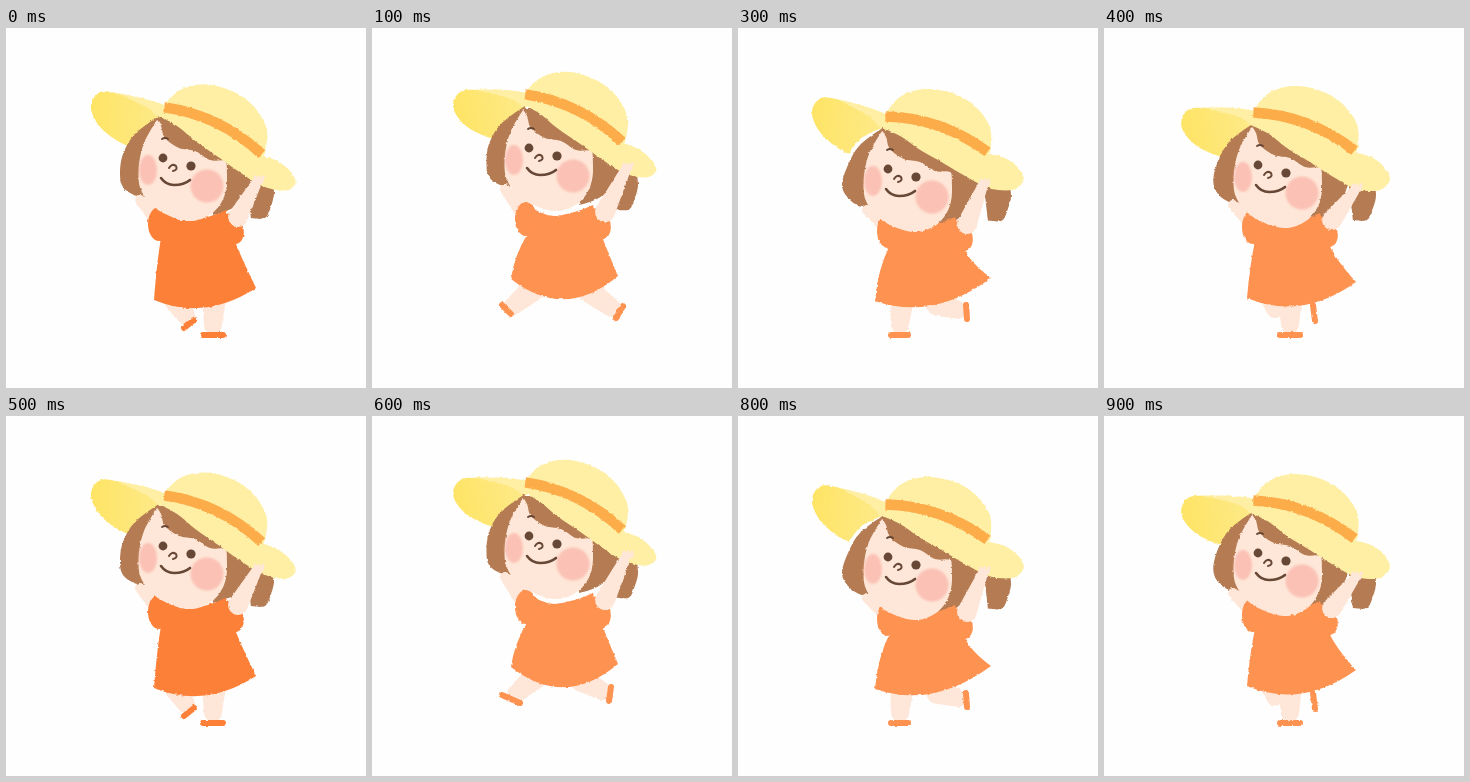
Write an HTML page that moves like this. It is 360 by 360 pixels and loops after 1000 ms.

```html
<!DOCTYPE html>
<html lang="en">
<head>
<meta charset="utf-8">
<title>Running girl</title>
<style>
html, body { margin: 0; width: 100%; height: 100%; overflow: hidden; background: #fefefe; }
svg { display: block; width: 100%; height: 100%; }
</style>
</head>
<body>
<svg viewBox="0 0 360 360">
  <defs>
    <filter id="crayon" filterUnits="userSpaceOnUse" x="0" y="0" width="360" height="360" color-interpolation-filters="sRGB">
      <feTurbulence id="noise" type="fractalNoise" baseFrequency="0.3" numOctaves="2" seed="1"/>
      <feDisplacementMap in="SourceGraphic" scale="2.6" xChannelSelector="R" yChannelSelector="G"/>
    </filter>
    <filter id="soft"><feGaussianBlur stdDeviation="0.8"/></filter>
    <linearGradient id="under">
      <stop offset="0" stop-color="#fee465"/><stop offset="1" stop-color="#fdea8c"/>
    </linearGradient>
  </defs>
  <g id="body" filter="url(#crayon)"></g>
  <g id="face"></g>
</svg>
<script>
const C = {
  hat: '#feefa4', band: '#fdac4a', hair: '#b57b53', skin: '#fee7d8',
  cheek: '#fbc1b5', ink: '#674735', deep: '#fd8039', light: '#fe9250'
};

// Key points of one pose: head centre, left end of the hat band, hat tilt,
// turn of the floppy side, brim depth, tail swing, neck, hem corners, hands, legs.
// A leg runs from hip to ankle; its shoe is a short stroke.
const leg = (hip, ankle, from, to) => ({ hip, ankle, from, to });
const pass = {
  head: [171, 134], hat: [160, 78], tilt: 24.5, flop: 0, brim: 1, swing: 0,
  neck: [181, 193], hem: [[148, 272], [250, 260]], hands: [[134, 172], [251, 154]], dress: C.deep,
  legs: [leg([171, 273], [180, 288], [178, 300], [188, 292]), leg([208, 270], [207, 297], [197, 307], [217, 307])]
};
const leap = {
  head: [171, 124], hat: [155, 65], tilt: 25, flop: -11, brim: 0.95, swing: -2,
  neck: [182, 188], hem: [[139, 251], [246, 248]], hands: [[133, 161], [254, 141]], dress: C.light,
  legs: [leg([160, 262], [140, 279], [130, 277], [139, 286]), leg([216, 262], [240, 280], [251, 278], [244, 290])]
};
const land = {
  head: [167, 135], hat: [159, 78], tilt: 23, flop: -6, brim: 0.95, swing: -1,
  neck: [176, 194], hem: [[138, 273], [244, 253]], hands: [[129, 174], [246, 151]], dress: C.light,
  legs: [leg([172, 273], [153, 296], [136, 294], [153, 305]), leg([200, 275], [219, 283], [226, 279], [227, 293])]
};
const cross = {
  head: [164, 145], hat: [149, 87], tilt: 18, flop: 3, brim: 1.15, swing: 12,
  neck: [178, 200], hem: [[137, 273], [253, 250]], hands: [[129, 182], [245, 157]], dress: C.light,
  legs: [leg([164, 270], [162, 297], [153, 307], [170, 307]), leg([200, 276], [220, 282], [228, 277], [229, 291])]
};
const rise = {
  head: [168, 141], hat: [151, 83], tilt: 19.5, flop: -11, brim: 1.2, swing: 7,
  neck: [177, 196], hem: [[143, 270], [252, 254]], hands: [[129, 177], [251, 162]], dress: C.light,
  legs: [leg([168, 270], [171, 281], [209, 277], [211, 293]), leg([186, 270], [186, 297], [176, 307], [196, 307])]
};
const wideLeap = { ...leap, legs: [
  leg([162, 262], [144, 278], [130, 279], [148, 287]), leg([210, 264], [230, 275], [239, 271], [237, 285])] };
const cycle = [pass, leap, land, cross, rise, pass, wideLeap, land, cross, rise];

// Smooth closed outline; "*" marks a corner.
function smooth(text) {
  const pts = text.split(' ').map(s => {
    const [x, y] = s.split(',').map(parseFloat);
    return { x, y, corner: s.endsWith('*') };
  });
  const n = pts.length, at = i => pts[(i + n) % n];
  const slope = i => at(i).corner ? [0, 0]
    : [(at(i + 1).x - at(i - 1).x) / 6, (at(i + 1).y - at(i - 1).y) / 6];
  let d = `M${pts[0].x} ${pts[0].y}`;
  for (let i = 0; i < n; i++) {
    const a = at(i), b = at(i + 1), u = slope(i), v = slope(i + 1);
    d += `C${a.x + u[0]} ${a.y + u[1]} ${b.x - v[0]} ${b.y - v[1]} ${b.x} ${b.y}`;
  }
  return d + 'Z';
}

const area = (d, color) => `<path d="${d}" fill="${color}"/>`;
const blob = (pts, color) => area(smooth(pts), color);
const line = (d, color, w, cap = 'round') =>
  `<path d="${d}" fill="none" stroke="${color}" stroke-width="${w}" stroke-linecap="${cap}"/>`;
const oval = (x, y, rx, ry, color, turn = 0, more = '') =>
  `<ellipse rx="${rx}" ry="${ry}" fill="${color}" transform="translate(${x} ${y}) rotate(${turn})" ${more}/>`;
const place = ([x, y], parts, turn = 0) =>
  `<g transform="translate(${x} ${y}) rotate(${turn})">${parts}</g>`;

// Limb with round ends of radius r and s.
function limb([ax, ay], [bx, by], r, s) {
  const len = Math.hypot(bx - ax, by - ay), nx = (ay - by) / len, ny = (bx - ax) / len;
  return area(`M${ax + nx * r} ${ay + ny * r}A${r} ${r} 0 0 1 ${ax - nx * r} ${ay - ny * r}`
    + `L${bx - nx * s} ${by - ny * s}A${s} ${s} 0 0 1 ${bx + nx * s} ${by + ny * s}Z`, C.skin);
}

const hair = swing =>
  blob(`-18,-46* -42,-28 -54,-8 ${-57 - swing / 4},12 -54,25 -43,33 -32,35*`, C.hair)
  + blob('40,-10* 78,10* 68,35 54,47 36,53*', C.hair)
  + place([swing, -0.7 * swing], blob('68,5* 92,16 97,30 94,44 88,56 74,56*', C.hair));

const head = blob('-20,-42* -33,-19 -38,4 -36,28 -19,48 11,59 34,52 47,35 50,13 45,-10 15,-32', C.skin)
  + blob('-21,-44* -16,-36 -12,-24 2,-14 18,-11 33,-2 48,-1 54,8* 70,14* 42,-18 2,-44*', C.hair);

const features = oval(-29, 8, 9, 15, C.cheek, 0, 'filter="url(#soft)"')
  + oval(30, 24, 16.5, 16.5, C.cheek, 0, 'filter="url(#soft)"')
  + oval(-14, -4, 4.4, 4.4, C.ink) + oval(14, 4, 4.6, 4.6, C.ink)
  + line('M-8 6Q-5 1 -1 4Q1 8 -4 9', C.ink, 2)
  + line('M-16 16Q-11 23 -3 23Q7 23 13 18', C.ink, 2.6)
  + line('M-15 -23Q-12 -25 -9 -23', C.ink, 2);

const flap = blob('-20,-6 -50,-13 -65,-14 -74,-5 -74,7 -65,22 -50,34 -36,41* -25,25 -6,14* 2,3*', 'url(#under)')
  + blob('-50,-13* -20,-7 4,3 -5,15* -18,2', C.hat);

const hat = brim => `<g transform="scale(1 ${brim})">`
  + blob('-4,3* 50,-8 107,5* 126,4 142,9 150,17 143,28 120,33 96,30 70,25 42,20 20,14 -2,12*', C.hat) + '</g>'
  + blob('-3,4* 6,-20 27,-36 55,-41 80,-36 101,-21 109,0 108,9*', C.hat)
  + line('M-1 2Q52 -14 107 4', C.band, 10.5, 'butt');

function dress([x, y], [[lx, ly], [rx, ry]]) {
  return `M${x - 29} ${y - 13}Q${x - 14} ${y - 1} ${x} ${y}Q${x + 20} ${y - 2} ${x + 39} ${y - 11}`
    + `L${x + 47} ${y + 18}Q${x + 53} ${y + 34} ${rx} ${ry}`
    + `Q${(lx + rx) / 2} 293 ${lx} ${ly}Q${lx + 3} ${y + 40} ${x - 26} ${y + 17}Z`;
}

function figure(p) {
  const [x, y] = p.neck, [left, right] = p.hands;
  const tips = [-3, 1, 5].map(d => `M${right[0] + d} ${right[1]}l1 -5`).join('');
  return place(p.hat, flap, p.flop)
    + place(p.head, hair(p.swing))
    + limb([x - 30, y - 4], left, 9, 5)
    + p.legs.map(l => limb(l.hip, l.ankle, 12, 9)
      + line(`M${l.from}L${l.to}`, p.dress, 6)).join('')
    + area(dress(p.neck, p.hem), p.dress)
    + oval(x - 28, y + 3, 11, 17, p.dress)
    + oval(x + 44, y + 8, 12, 16, p.dress, -25)
    + place(p.head, head)
    + place(p.hat, hat(p.brim), p.tilt)
    + limb([x + 51, y - 4], right, 10, 5) + line(tips, C.skin, 3);
}

const body = document.getElementById('body');
const face = document.getElementById('face');
const noise = document.getElementById('noise');
let shown = -1;

function tick() {
  const step = Math.floor(performance.now() % 1000 / 100);
  if (step !== shown) {
    shown = step;
    const pose = cycle[step];
    noise.setAttribute('seed', step + 1);
    body.innerHTML = figure(pose);
    face.innerHTML = place(pose.head, features);
  }
  requestAnimationFrame(tick);
}
tick();
</script>
</body>
</html>
```
